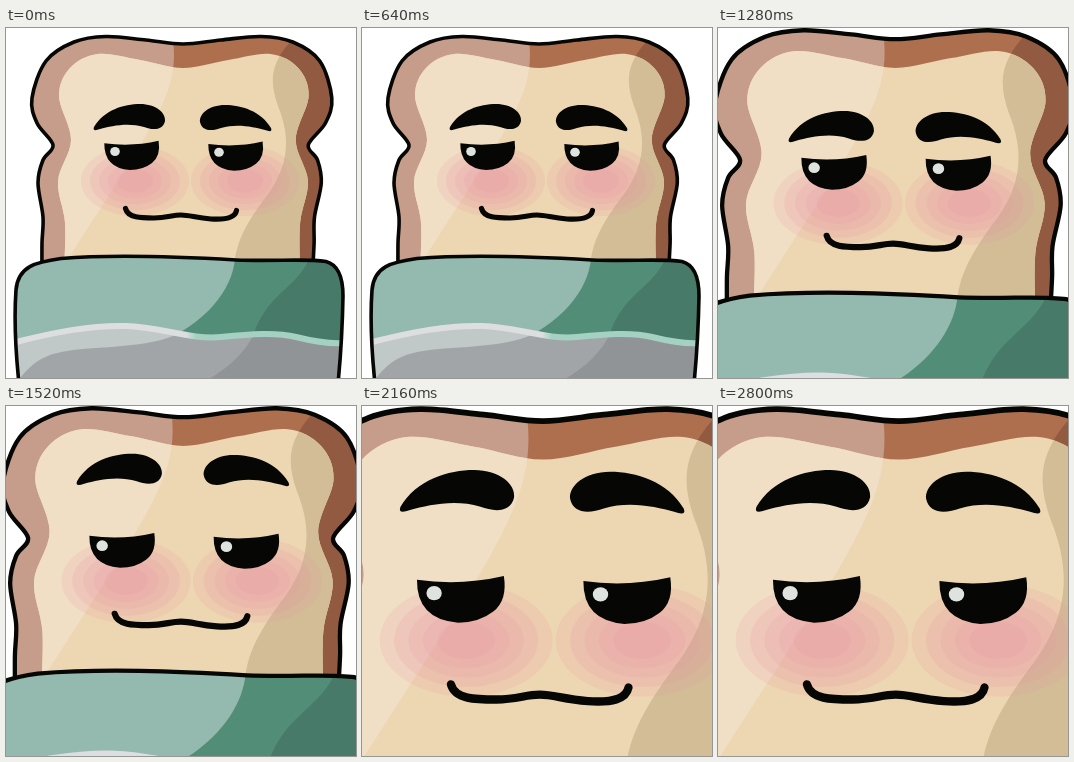
An HTML page with a canvas that plays this animation: 350x350 px, repeating every 2.88 s.

```html
<!DOCTYPE html>
<html lang="en">
<head>
<meta charset="utf-8">
<title>Cosy toast</title>
<style>
  html, body { margin: 0; width: 100%; height: 100%; overflow: hidden; background: #fff; }
  canvas { display: block; width: 350px; height: 350px; }
</style>
</head>
<body>
<canvas id="stage" width="350" height="350"></canvas>
<script>
const ctx = document.getElementById('stage').getContext('2d');
const INK = '#060704';
const STEP = 80, STEPS = 36, STEPS_PER_SHOT = 12, STEPS_PER_LIFT = 4;
const SHOTS = [
  { scale: 1, x: 0, y: 0, lift: 26 },
  { scale: 1.195, x: -34.1, y: -7.9, lift: 29.4 },
  { scale: 1.6, x: -102.3, y: -10.5, lift: 29.4 }
];

// Smooth outline through the left half's points and their slightly leaning mirror image
function slice(leftHalf, width, lean) {
  const left = leftHalf.split(' ').map(p => p.split(',').map(Number));
  const right = left.slice(0, -1).reverse().map(([x, y]) => [width - x - lean * y, y]);
  const pts = [...left, ...right];
  const at = i => pts[Math.max(0, Math.min(pts.length - 1, i))];
  const path = new Path2D();
  path.moveTo(...pts[0]);
  for (let i = 0; i < pts.length - 1; i++) {
    const [a, b, c, d] = [at(i - 1), at(i), at(i + 1), at(i + 2)];
    path.bezierCurveTo(
      b[0] + (c[0] - a[0]) / 6, b[1] + (c[1] - a[1]) / 6,
      c[0] - (d[0] - b[0]) / 6, c[1] - (d[1] - b[1]) / 6, ...c);
  }
  path.closePath();
  return path;
}

// Area between a downward curve and a vertical line at x
function side(curve, x) {
  const path = new Path2D(curve);
  path.lineTo(x, 370);
  path.lineTo(x, -20);
  path.closePath();
  return path;
}

const crust = slice('36,245 36,215 37,189 32,155 37,132 47,117 31,95 26,70 40,33 68,14 100,8.5 140,12 177,16', 355.5, .053);
const crumb = slice('58,245 59,195 52,153 65,112 53,68 64,40 92,26 134,32 177,40', 357, .02);
const blanket = new Path2D('M14 365C10 330 8 290 10 262C12 238 30 234 55 230.5C110 226 170 228.5 230 232C270 233.5 300 230.5 320 233.5C333 237 337 250 337 268Q336 320 331 365Z');

const shadeEdge = 'M290 8C262 35 264 55 272 78C284 108 284 135 262 166C240 195 232 212 229 231C226 262 200 296 150 316';
const glow = side('M165 0C174 45 163 70 126 131L56 240', -20);
const shade = side(shadeEdge, 380);
const sheen = side(shadeEdge, -20);
const fold = side('M306 225C292 262 262 262 247 308Q230 340 185 360', 380);
const liningGlow = side('M190 290C178 312 140 317 90 320S30 330 10 355', -20);
const waveLine = 'M10 314C50 304 85 297 120 298S185 312 215 309S270 304 290 309S325 316 338 315';
const wave = new Path2D(waveLine);
const lining = new Path2D(waveLine + 'V365H10Z');

const brow = new Path2D('M88 99C98 82 118 76 134 76C150 76 160 85 159 93C157 103 146 102 138 99C122 94 105 98 94 101Q86 104 88 99Z');
const eye = new Path2D('M98.3 115.2Q126 119 152.6 112.8Q155 128 146 135Q137 142 124 142Q98 140 98.3 115.2Z');
const mouth = new Path2D('M119.5 180.5C122 190 135 190 148 190S166 187 175 187S190 190 205 191S229 190 230.5 182.5');

const waveInk = ctx.createLinearGradient(180, 0, 190, 0);
waveInk.addColorStop(0, '#dcdedf');
waveInk.addColorStop(1, '#a5d1c3');

function fill(path, color) {
  ctx.fillStyle = color;
  ctx.fill(path);
}

function ellipse(x, y, rx, ry, color) {
  const path = new Path2D();
  path.ellipse(x, y, rx, ry, 0, 0, 2 * Math.PI);
  fill(path, color);
}

function stroke(path, color, width) {
  ctx.strokeStyle = color;
  ctx.lineWidth = width;
  ctx.stroke(path);
}

function bands(path, left, right, [leftColor, color, rightColor]) {
  fill(path, color);
  ctx.save();
  ctx.clip(path);
  fill(left, leftColor);
  fill(right, rightColor);
  ctx.restore();
}

function drawFace(rise) {
  for (const x of [129, 239])
    for (let rx = 54; rx > 10; rx -= 9)
      ellipse(x, 153, rx, rx * .65, 'rgba(228,142,162,.16)');
  stroke(mouth, INK, 5.2);

  ctx.save();
  for (let i = 0; i < 2; i++) {
    fill(eye, INK);
    ellipse(109, 123.5, 4.8, 4.5, '#dfe3df');
    ctx.translate(104, .8);
  }
  ctx.restore();

  ctx.save();
  ctx.translate(0, -rise);
  fill(brow, INK);
  ctx.transform(-1, 0, 0, 1, 353, 1);
  fill(brow, INK);
  ctx.restore();
}

function drawBlanket() {
  bands(blanket, sheen, fold, ['#94b9ae', '#528d78', '#477a69']);
  ctx.save();
  ctx.clip(blanket);
  bands(lining, liningGlow, fold, ['#c1c9c8', '#a2a5a8', '#909497']);
  stroke(wave, waveInk, 6);
  ctx.restore();
  stroke(blanket, INK, 3.6);
}

function draw(step) {
  const shot = SHOTS[Math.floor(step / STEPS_PER_SHOT)];
  const rise = shot.lift * (step % STEPS_PER_LIFT) / (STEPS_PER_LIFT - 1);

  ctx.setTransform(1, 0, 0, 1, 0, 0);
  ctx.fillStyle = '#fff';
  ctx.fillRect(0, 0, 350, 350);
  ctx.setTransform(shot.scale, 0, 0, shot.scale, shot.x, shot.y);
  ctx.lineCap = ctx.lineJoin = 'round';

  bands(crust, glow, shade, ['#c69c8a', '#ae6f4f', '#935a42']);
  bands(crumb, glow, shade, ['#f0dfc4', '#edd6b2', '#d2bd96']);
  stroke(crust, INK, 3.6);
  drawFace(rise);
  drawBlanket();
}

function tick() {
  draw(Math.floor(performance.now() / STEP) % STEPS);
  requestAnimationFrame(tick);
}
tick();
</script>
</body>
</html>
```
